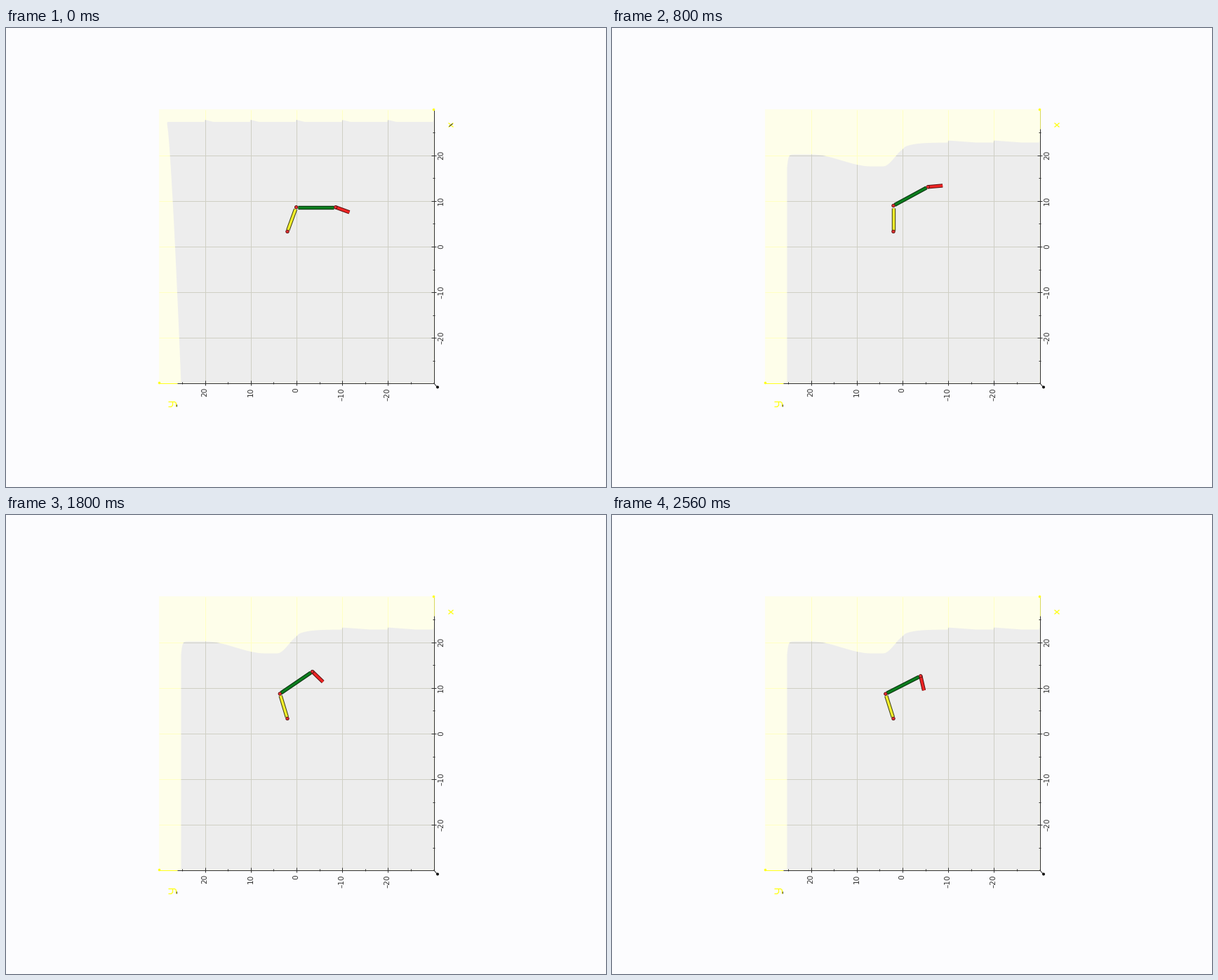
A matplotlib script that plays this animation: 855x655 px, repeating every 2.6 s.

```python
import numpy as np
import matplotlib.pyplot as plt
from matplotlib.animation import FuncAnimation
from matplotlib.patches import Circle, Polygon, Rectangle

W, H, DPI = 855, 655, 100
PX = 72 / DPI
FRAMES, INTERVAL = 65, 40

PAGE, PALE, FLOOR = "#fcfcfe", "#fefeea", "#ededed"
YELLOW, PALE_GRID, GRID = "#ffff1e", "#ffffc4", "#cfcfc4"
INK = "#303030"
LEFT, RIGHT, TOP, BOTTOM = 218, 610, 117, 507
STEP, ORIGIN_X, ORIGIN_Y = 65.15, 414, 312

fig = plt.figure(figsize=(W / DPI, H / DPI), dpi=DPI, facecolor=PAGE)
ax = fig.add_axes([0, 0, 1, 1])
ax.set_xlim(0.5, W + 0.5)
ax.set_ylim(H + 0.5, 0.5)
ax.axis("off")


def line(xs, ys, color, width=1.0, z=3):
    art, = ax.plot(xs, ys, color=color, lw=width * PX, zorder=z,
                   solid_capstyle="butt")
    return art


def dot(x, y, r, color, z=4, edge="none"):
    return ax.add_patch(Circle((x, y), r, fc=color, ec=edge, lw=0.9 * PX, zorder=z))


def grid(color, z, clip=None):
    arts = []
    for i in range(-2, 3):
        x, y = round(ORIGIN_X + i * STEP), round(ORIGIN_Y + i * STEP)
        arts.append(line([x, x], [TOP, BOTTOM], color, z=z))
        arts.append(line([LEFT, RIGHT], [y, y], color, z=z))
    if clip is not None:
        for art in arts:
            art.set_clip_path(clip)
    return arts


def ease(x, a, b):
    t = np.clip((x - a) / (b - a), 0, 1)
    return t * t * (3 - 2 * t)


def teeth(x, width):
    """Small spikes that start at each grid line and fade to the right."""
    return 3 * np.clip(1 - ((x - ORIGIN_X) % STEP) / width, 0, 1)


def floor(left_x, left_y, top_x, top_y):
    xs = np.concatenate([left_x, top_x, [RIGHT]])
    ys = np.concatenate([left_y, top_y, [BOTTOM]])
    patch = ax.add_patch(Polygon(np.column_stack([xs, ys]), fc=FLOOR, ec="none", zorder=2))
    return [patch] + grid(GRID, 2.5, patch)


def straight_floor():
    u = np.linspace(1, 0, 30)
    x = np.arange(231, RIGHT + 1)
    return floor(230 + 20 * u ** 0.75, 136 + (BOTTOM - 136) * u, x, 134.5 - teeth(x, 12))


def wavy_floor():
    x = np.arange(250, RIGHT + 1)
    y = 181 + 19 * np.exp((250 - x) / 1.5)
    y += 17 * ease(x, 285, 370) - 26 * ease(x, 387, 420)
    y -= 8 * (1 - np.exp(-np.clip(x - ORIGIN_X, 0, None) / 14))
    y -= teeth(x, 40) * (x > 478)
    return floor([250], [BOTTOM], x, y)


# Pale sheet with the grey floor over it
ax.add_patch(Rectangle((LEFT, TOP - 1), RIGHT - LEFT, BOTTOM - TOP + 1,
                       fc=PALE, ec="none", zorder=1))
grid(PALE_GRID, 1.5)
first_floor, main_floor = straight_floor(), wavy_floor()

# Axes, ticks and numbers
line([LEFT, 245], [BOTTOM, BOTTOM], YELLOW)
line([244, RIGHT], [BOTTOM, BOTTOM], INK)
line([RIGHT, RIGHT], [TOP, 146], "#d8d860")
line([RIGHT, RIGHT], [144, BOTTOM], INK)
first_axis = line([RIGHT, RIGHT], [TOP, 146], INK, z=3.2)
dot(RIGHT, TOP, 1.8, YELLOW)
dot(LEFT + 1, BOTTOM, 1.8, YELLOW)
line([RIGHT, 615], [BOTTOM, 513], INK)
dot(615.5, 513, 2, "#101010")

font = dict(family="DejaVu Sans", fontsize=10.5 * PX, color=INK, rotation=90, zorder=4)
for i in range(-5, 6):
    x, y = round(ORIGIN_X + i * STEP / 2), round(ORIGIN_Y + i * STEP / 2)
    reach = 1.5 if i % 2 else 3.5
    line([x, x], [BOTTOM - reach, BOTTOM + reach], INK)
    line([RIGHT - reach, RIGHT + reach], [y, y], INK)
    if i % 2 == 0:
        label = str(-5 * i).replace("-", "\u2013")
        ax.text(x, 513.5, label, ha="center", va="top", **font)
        ax.text(620.5, y, label, ha="center", va="center", **font)

# Axis names, lying on their sides
for ends in ((136, 142), (142, 136)):
    line([631, 638], ends, YELLOW, 1.4)
x_shade = line([632, 637], [141, 137], INK, 1.1, z=3.2)
line([232, 241, 243, 243], [534, 534, 536, 541], YELLOW, 1.4)
line([232, 236, 238, 238], [541, 541, 539, 534], YELLOW, 1.4)
line([243, 243], [537.5, 540], INK)

# Three-link arm: bend of each joint in degrees at the key times
BASE = np.array([401.5, 291.0])
KEYS = [0, 40, 50, 64]
LINKS = [
    dict(bend=[20, -20, -13.6, -17.5], length=37, span=(2, 34), fill="#f4f02c", rim="#3c3c10"),
    dict(bend=[70, 53, 92, 80.5], length=56, span=(2, 53.5), fill="#0c7e1e", rim="#082c0c"),
    dict(bend=[20, 27, 129.5, 104], length=21, span=(0, 21), fill="#f02424", rim="#581010"),
]
for z, link in enumerate(LINKS):
    link["bars"] = [line([], [], link["rim"], 5.4, 6 + z / 10),
                    line([], [], link["fill"], 3.4, 6.05 + z / 10)]
    link["joint"] = dot(*BASE, 2.2, "#f03030", 7, "#501010")


def draw(k):
    first = k == 0
    for art in first_floor + [first_axis, x_shade]:
        art.set_visible(first)
    for art in main_floor:
        art.set_visible(not first)

    start, angle = BASE, 0.0
    for link in LINKS:
        angle += np.radians(np.interp(k, KEYS, link["bend"]))
        way = np.array([np.sin(angle), -np.cos(angle)])
        ends = np.array([start + way * s for s in link["span"]])
        for bar in link["bars"]:
            bar.set_data(ends[:, 0], ends[:, 1])
        link["joint"].center = tuple(start)
        start = start + way * link["length"]
    return []


anim = FuncAnimation(fig, draw, frames=FRAMES, interval=INTERVAL,
                     init_func=lambda: draw(0), repeat=True, repeat_delay=0)
plt.show()
```
